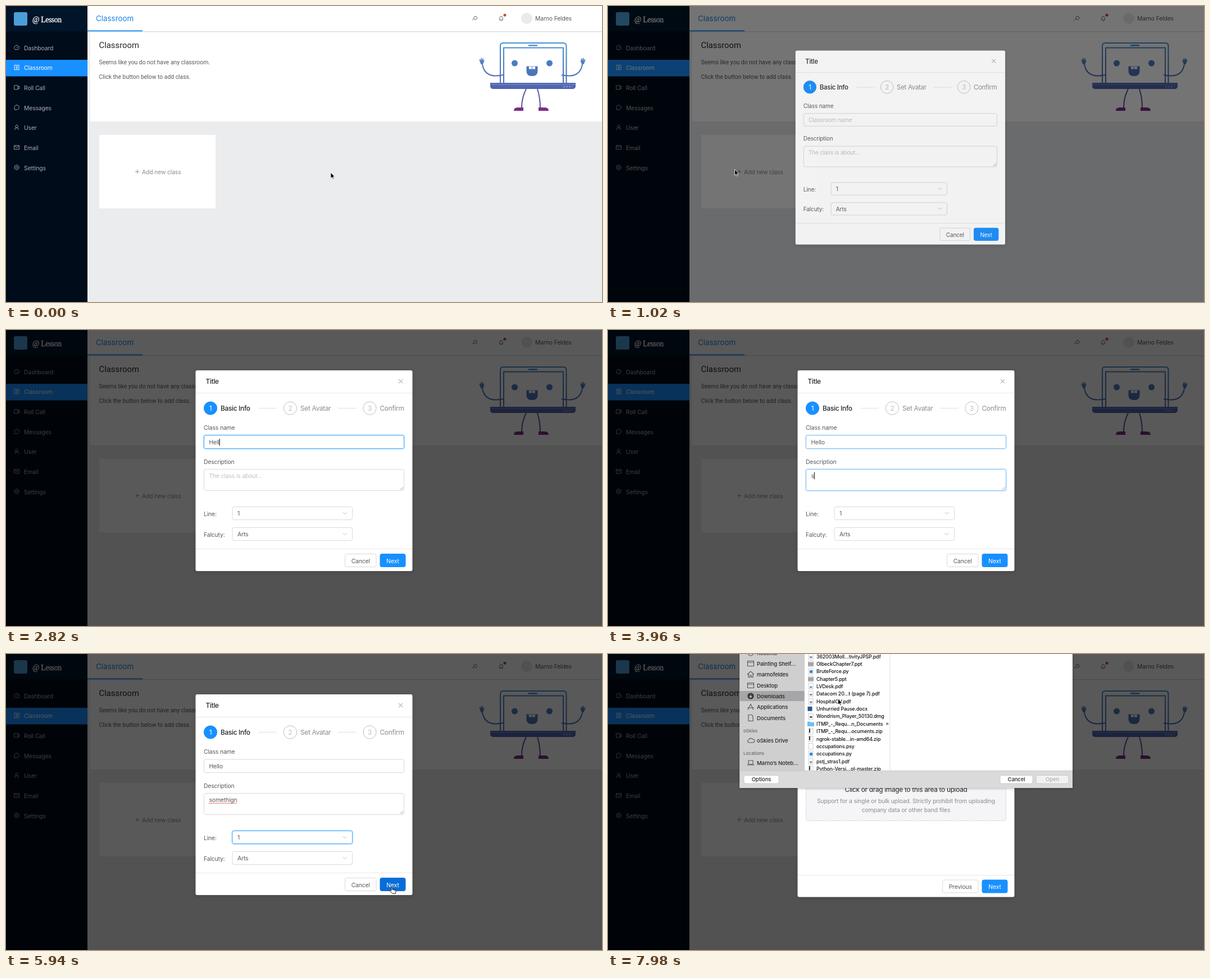
An HTML page that plays this animation: 1061x528 px, repeating every 8000 ms.

```html
<!DOCTYPE html>
<html lang="en">
<head>
<meta charset="utf-8">
<title>Classroom</title>
<style>
html, body { margin: 0; width: 100%; height: 100%; overflow: hidden; background: #ebecee; }
svg { display: block; }
text { font-family: Inter, sans-serif; white-space: pre; }
.page { font-family: Roboto, sans-serif; }
.brand { font-family: "Liberation Serif", serif; }
.mid { text-anchor: middle; }
.bold, #sheet text { font-weight: 500; }
</style>
</head>
<body>
<svg id="stage" width="1061" height="528" viewBox="0 0 1061 528"></svg>
<script>
const LOOP = 8000;
const BLUE = '#1890ff', LIGHT = '#40a9ff', DARK = '#096dd9';
const INK = '#262626', BODY = '#595959', PALE = '#bfbfbf', EDGE = '#d9d9d9';

// ---- markup helpers ----
const text = (x, y, size, str, fill = BODY, more = '') =>
  `<text x="${x}" y="${y}" font-size="${size}" fill="${fill}" letter-spacing="${size > 11 ? -.025 : -.015}em" ${more}>${str}</text>`;
const rect = (x, y, w, h, fill, more = '') =>
  `<rect x="${x}" y="${y}" width="${w}" height="${h}" fill="${fill}" ${more}/>`;
const line = (d, stroke, width = 1, more = '') =>
  `<path d="${d}" fill="none" stroke="${stroke}" stroke-width="${width}" ${more}/>`;
const dot = (x, y, r, fill, more = '') => `<circle cx="${x}" cy="${y}" r="${r}" fill="${fill}" ${more}/>`;
const group = (id, body) => `<g id="${id}">${body}</g>`;
const at = (x, y, body) => `<g transform="translate(${x} ${y})">${body}</g>`;
const field = (id, x, y, w, h) =>
  rect(x - 1, y - 1, w + 2, h + 2, 'none', `id="${id}Glow" rx="4" stroke="${BLUE}" stroke-opacity=".2" stroke-width="2"`) +
  rect(x, y, w, h, '#fff', `id="${id}" rx="3" stroke="${EDGE}"`);
const button = (x, y, w, label, fill, ink, edge, id = '') =>
  rect(x, y, w, 23, fill, `rx="3" stroke="${edge}" ${id && `id="${id}"`}`) +
  text(x + w / 2, y + 16, 10.4, label, ink, 'class="mid"');

// ---- page ----
const menu = [
  ['Dashboard', 'M-3 3.6A4.3 4.3 0 1 1 3 3.6ZM0 1L2 -1.5'],
  ['Classroom', 'M-4 -4H4V4H-4ZM-1.5 -1.8H2M-1.5 0H2M-1.5 1.8H2'],
  ['Roll Call', 'M-4.4 -3.5H2.2V3.5H-4.4ZM2.2 -1.3L4.6 -2.4V2.4L2.2 1.3'],
  ['Messages', 'M-4 4V0A4.1 4.1 0 1 1 0 4Z'],
  ['User', 'M-3.6 4.4Q-3.4 .6 0 .6T3.6 4.4M0 .6A2.4 2.4 0 1 1 .1 .6'],
  ['Email', 'M-4.4 -3.4H4.4V3.4H-4.4ZM-4.2 -3L0 .4 4.2 -3'],
  ['Settings', 'M0 -4.4L3.8 -2.2V2.2L0 4.4 -3.8 2.2V-2.2ZM0 -1.6A1.6 1.6 0 1 0 .1 -1.6']
];

const sidebar = rect(0, 0, 145, 528, '#000c1a') + rect(0, 0, 145, 45, '#001529') +
  rect(14, 11, 24, 24, '#4a9fd8', 'rx="3"') +
  text(47, 29, 13.6, '@ Lesson', '#fff', 'class="brand" stroke="#fff" stroke-width=".3"') +
  rect(0, 96, 145, 29.5, BLUE) +
  menu.map(([label, icon], i) => {
    const y = 75 + 35.65 * i, ink = i == 1 ? '#fff' : '#a6adb4';
    return at(19, y - 1, line(icon, ink, .9)) + text(32, y + 3.8, 10.4, label, ink);
  }).join('');

const header = rect(145, 0, 916, 45, '#fff') + rect(145, 45, 916, 1.5, '#dcdde0') +
  text(160, 26.5, 13.4, 'Classroom', '#1c84e6', 'style="letter-spacing:0"') +
  rect(145, 43.4, 98, 1.8, BLUE) +
  line('M834.8 24A2.9 2.9 0 1 1 835.2 24.1M832.8 22.8L830 25.6', BODY, 1) +
  line('M877.8 24.8H885.2M878.8 24.5V21.5A2.7 2.7 0 0 1 884.2 21.5V24.5M880.6 26.3H882.4M881.5 18V19', BODY, .9) +
  dot(888, 16.3, 2.5, '#c4512d') + dot(927, 22, 10, '#e9eaec') +
  text(942, 26, 10.4, 'Marno Feldes');

const palm = 'M-1.5 6L-3.5 1Q-5 -3 -3.6 -3T-1.6 0L-1.6 -5Q-.8 -6 0 -5L.5 -1 2 -5Q3.4 -5 3 -3L2.6 0 4 -1.6Q5 -1.6 4.4 0L2 6Z';
const mascot = `<linearGradient id="tone" gradientUnits="userSpaceOnUse" x1="0" y1="62" x2="0" y2="188">
  <stop stop-color="#4592d4"/><stop offset=".6" stop-color="#4f6ab2"/><stop offset="1" stop-color="#64429a"/></linearGradient>` +
  line('M880 137V71Q880 66 885 66H992Q997.5 66 997.5 71V137M886 137V74.5H992V137', 'url(#tone)', 2) +
  line('M930 70.3H946', 'url(#tone)', 2.4) +
  line('M885 123Q852 130 848 104M989 123Q1022 130 1026 104M926 148Q918 164 918 181M946 148Q951 164 951 181', 'url(#tone)', 2) +
  `<g fill="url(#tone)"><path d="M862 137H1014V143Q1014 148 1008 148H868Q862 148 862 143Z"/>
  <circle cx="905.5" cy="102" r="5.5"/><circle cx="967.5" cy="102" r="5.5"/>
  <path d="M926.5 107.5H946.5V116Q946.5 125 936.5 125T926.5 116Z"/></g>` +
  line('M863 140H1013', '#7f9ed0', .8) + line('M992 144H1008', '#cfd8ee', 1, 'stroke-dasharray="3 2"') +
  rect(931, 108, 5, 4.5, '#fff') + rect(937, 108, 5, 4.5, '#fff') +
  at(847, 98, `<path d="${palm}" fill="#4f7fc4"/>`) +
  `<path transform="translate(1027 98) scale(-1 1)" d="${palm}" fill="#4f7fc4"/>` +
  '<path d="M904 187Q904 180.5 912 181H921V187ZM966 187Q966 180.5 958 181H948V187Z" fill="#7b2f84"/>';

const page = rect(0, 0, 1061, 528, '#ebecee') + rect(149.5, 46, 911.5, 160, '#fff') + header +
  text(165.5, 75, 14.84, 'Classroom', INK, 'class="page" style="letter-spacing:0"') +
  text(165.5, 104, 10.35, 'Seems like you do not have any classroom.', BODY, 'class="page" style="letter-spacing:0"') +
  text(165.5, 130, 10.35, 'Click the button below to add class.', BODY, 'class="page" style="letter-spacing:0"') +
  mascot + rect(166, 230, 207, 131, '#fff') +
  line('M230 295.5H237.5M233.7 291.7V299.3', '#8c8c8c', .9) +
  text(242, 300, 10.4, 'Add new class', '#8c8c8c') + sidebar;

// ---- modal ----
const step = (x, n, label, state) => {
  const on = state == 'on', done = state == 'done';
  return dot(x, 139.5, 11.6, on ? BLUE : '#fff', `stroke="${on || done ? BLUE : PALE}"`) +
    (done ? line(`M${x - 4.5} 139L${x - 1} 142.5 ${x + 5} 135`, BLUE, 1.2)
          : text(x, 143.7, 11.87, n, on ? '#fff' : PALE, 'class="mid"')) +
    text(x + 18, 144, 11.87, label, on ? INK : done ? BODY : '#8c8c8c', on ? 'class="bold"' : '');
};
const select = (id, y, label, value) => text(352, y + 16.3, 10.4, label) +
  field(id, 403, y, 213.5, 23) + text(412, y + 15.5, 10.4, value) +
  line(`M599.5 ${y + 9.5}L603 ${y + 13} 606.5 ${y + 9.5}`, PALE, 1);

const form = step(364, 1, 'Basic Info', 'on') + step(506, 2, 'Set Avatar') + step(647.5, 3, 'Confirm') +
  line('M450 139.5H482M591 139.5H624', '#e0e0e0') +
  text(352, 178, 10.4, 'Class name') + field('name', 352.5, 188, 356, 23.5) +
  text(361.5, 204, 10.4, '', PALE, 'id="nameText"') +
  text(352, 238.5, 10.4, 'Description') + field('desc', 352.5, 248.5, 356, 38) +
  text(361.5, 263.8, 10.4, '', PALE, 'id="descText"') +
  line('M702 285L707 280M705 285L707 283', '#8c8c8c', .8) +
  line('M361.5 266.3H411.5', '#e0442e', 1.3, 'id="typo" stroke-dasharray="1.5 1"') +
  line('M0 -10V2.5', '#000', 1, 'id="caret"') +
  select('line', 315.5, 'Line:', '1') + select('faculty', 352.5, 'Falcuty:', 'Arts') +
  line('M338 390.5H723', '#e8e8e8') +
  button(603.5, 399.5, 55.5, 'Cancel', '#fff', BODY, EDGE) + button(666, 399.5, 45, 'Next', BLUE, '#fff', BLUE, 'next1');

const upload = step(364, 1, 'Basic Info', 'done') + step(506, 2, 'Set Avatar', 'on') + step(647.5, 3, 'Confirm') +
  line('M447 139.5H482', BLUE) + line('M595 139.5H624', '#e0e0e0') +
  rect(352.5, 167, 356, 130.5, '#f5f5f7', 'id="drop" rx="3" stroke-dasharray="2.5 1.5"') +
  line('M518 196.5L521 184H539.5L543 196.5V209H518ZM518 197H525Q525.5 202 530.5 202T536 197H543', LIGHT, 2.4, 'stroke-linejoin="round"') +
  text(530.5, 246.3, 11.87, 'Click or drag image to this area to upload', INK, 'class="mid"') +
  text(530.5, 266, 10.4, 'Support for a single or bulk upload. Strictly prohibit from uploading', '#8c8c8c', 'class="mid"') +
  text(530.5, 281.7, 10.4, 'company data or other band files', '#8c8c8c', 'class="mid"') +
  line('M338 394.5H723', '#e8e8e8') +
  button(595.5, 403, 63.5, 'Previous', '#fff', BODY, EDGE) + button(666, 403, 45, 'Next', LIGHT, '#fff', LIGHT, 'next2');

const modal = rect(337.5, 72, 386, 358, '#fff', 'id="box" rx="3" style="filter:drop-shadow(0 2px 4px #0002)"') +
  text(355.5, 96.3, 11.87, 'Title', INK, 'class="bold"') +
  line('M699 88L706 95M706 88L699 95', '#8c8c8c', 1) + line('M338 112.5H723', '#e8e8e8') +
  group('form', form) + group('upload', upload);

// ---- file sheet ----
const places = [[-2, 'Recents'], [17, 'Painting Shelf…'], [36.5, 'marnofeldes'], [56, 'Desktop'], [75, 'Downloads'],
  [94.5, 'Applications'], [114, 'Documents'], [137, '#oSkies'], [154, 'oSkies Drive'], [177, '#Locations'],
  [194, 'Marno’s Noteb…'], [213.5, 'Remote Disc'], [233, 'Network'], [256, '#Media'], [272, 'Music'],
  [291.5, 'Photos'], [311, 'Movies'], [335, '#Tags'], [351, 'Green'], [370, 'Gray']];
const placeIcon = (label, y) => {
  if (/Green|Gray/.test(label)) return dot(254, y, 4.7, '#8e8e92');
  if (label == 'Downloads') return dot(254, y, 5.6, '#333') + line(`M254 ${y - 3}V${y + 2.5}M251.5 ${y}L254 ${y + 2.7} 256.5 ${y}`, '#ddd', 1.1);
  const shapes = {
    marnofeldes: 'M248 0L254 -5.5 260 0M250 -1V5H252.8V1.5H255.2V5H258V-1',
    Applications: 'M249 5L254 -5 259 5M248 1.5H260',
    Documents: 'M250 -5.5H256L258 -3V5.5H250Z',
    'oSkies Drive': 'M250.5 4A2.6 2.6 0 0 1 250.5 -1 4 4 0 0 1 257.5 -2 3 3 0 0 1 258 4Z',
    'Marno’s Noteb…': 'M250 -4H258V2.5H250ZM247.5 4H260.5',
    Movies: 'M248.5 -5H259.5V5H248.5ZM251 -5V5M257 -5V5M251 0H257',
    Recents: 'M254 -5A5 5 0 1 0 254.1 -5M254 -3V0H256.5'
  };
  return at(0, y, line(shapes[label] || 'M248.5 -4.5H259.5V4.5H248.5ZM248.5 -2H259.5', '#555', 1.1));
};
const placeList = places.map(([y, label]) => label[0] == '#'
  ? text(241, y + 3, 8.2, label.slice(1), '#6a6a6d')
  : placeIcon(label, y) + text(265, y + 3.5, 9.6, label, INK)).join('');

const files = ['362003Moll…tivityJPSP.pdf', 'OlbeckChapter7.ppt', 'BruteForce.py', 'Chapter5.ppt', 'LVDesk.pdf',
  'Datacom 20…t (page 7).pdf', 'HospitalCV.pdf', 'Unhurried Pause.docx', 'Wondrism_Player_50130.dmg',
  'ITMP_-_Requ…n_Documents', 'ITMP_-_Requ…ocuments.zip', 'ngrok-stable…in-amd64.zip', 'occupations.psy',
  'occupations.py', 'pstj_stras1.pdf', 'Python-Versi…ol-master.zip'];
const fileIcon = name => {
  const kind = name.split('.').pop();
  if (kind == name) return '<path d="M355 -4H359L360.5 -2.7H367V4.5H355Z" fill="#6fc0f0"/>';
  if (kind == 'docx') return rect(355.5, -4, 8, 8, '#2b579a');
  const leaf = rect(357, -5, 8, 10, '#fff', 'stroke="#b5b5b5" stroke-width=".7"');
  const mark = { py: [359, -2, 5, 5, '#2f86d0'], pdf: [359, 0, 4.5, 3, '#7d93a8'], zip: [358, -4.5, 2, 7, '#333'],
    ppt: [356, -3, 10, 7, '#a5a5a5'], dmg: [359, 0, 4.5, 2.5, '#444'] }[kind];
  return leaf + (mark ? rect(...mark) : '');
};
const fileList = files.map((name, i) => {
  const y = 4.2 + 13.37 * i;
  return at(0, y, fileIcon(name)) + text(371, y + 3.3, 8.8, name, '#111');
}).join('') + '<path d="M495.5 122L500.5 124.5 495.5 127Z" fill="#777"/>';

const sheetButton = (x, w, label, ink, fill) =>
  rect(x, 216.5, w, 14.5, fill, 'rx="3" stroke="#c4c4c4" stroke-width=".8"') + text(x + w / 2, 227.4, 9.6, label, ink, 'class="mid"');
const sheet = rect(234.5, -20, 592.5, 259, '#fff', 'style="filter:drop-shadow(0 1px 2px #0004)"') +
  rect(234.5, 0, 115.5, 208, '#ededef', 'id="side"') +
  `<svg width="1061" height="208" viewBox="0 0 1061 208">` +
  rect(234.5, 66, 115.5, 18, '#a6a6a8', 'id="picked"') + group('places', placeList) + group('files', fileList) + '</svg>' +
  line('M350 0V208M502 0V208', '#dcdcdc', .9) +
  rect(234.5, 208, 592.5, 31, '#ececec', 'id="foot"') + line('M234.5 208.3H827', '#c6c6c6', .8) +
  sheetButton(242, 62, 'Options', INK, '#fff') + sheetButton(698, 58, 'Cancel', INK, '#fff') +
  sheetButton(762, 58, 'Open', '#aeaeb0', '#f1f1f1');

const cursors =
  group('arrow', '<path d="M0 0V10.5L2.4 8.3 4 11.8 5.6 11.1 4.1 7.7H7.4Z" stroke="#fff" stroke-width=".8"/>') +
  group('beam', line('M-2.5 -6Q0 -6 0 -4V4Q0 6 -2.5 6M2.5 -6Q0 -6 0 -4M0 4Q0 6 2.5 6M-1.5 2H1.5', '#000', 1.1)) +
  group('hand', '<path d="M-1 1.2Q-1 0 0 0T1 1.2V4.5L6.2 6Q7.3 6.4 7.2 7.5L6.4 11.8H1L-3.4 7.2Q-4 6 -3 5.6T-1 6.8Z" fill="#fff" stroke="#000" stroke-width=".9"/>');

const $ = id => document.getElementById(id);
$('stage').innerHTML = page + rect(0, 0, 1061, 528, '#000', 'id="mask"') + group('modal', modal) +
  group('sheet', sheet) + group('cursor', cursors);

// ---- motion ----
const set = (id, attrs) => { for (const k in attrs) $(id).setAttribute(k, attrs[k]); };
const show = (id, on) => set(id, { visibility: on ? 'inherit' : 'hidden' });
const paint = (id, fill) => set(id, { fill, stroke: fill });
const clamp = v => Math.max(0, Math.min(1, v));
const smooth = v => (v = clamp(v)) * v * (3 - 2 * v);

// cubic-bezier(.08, .82, .17, 1)
function zoomEase(x) {
  let lo = 0, hi = 1, u;
  const curve = (a, b) => 3 * (1 - u) ** 2 * u * a + 3 * (1 - u) * u * u * b + u ** 3;
  for (let i = 0; i < 20; i++) {
    u = (lo + hi) / 2;
    curve(.08, .17) < x ? lo = u : hi = u;
  }
  return curve(.82, 1);
}

const OPEN = 870, FOCUS = 1560, TAB1 = 3840, TAB2 = 5050, STEP2 = 6000, LOADED = 7420;
const moves = [[60, 578, 297], [780, 225.5, 291.5], [1080, 225.5, 291.5], [1500, 510, 202], [5100, 510, 202],
  [5700, 687, 415.5], [6180, 687, 415.5], [6780, 397, 196], [7320, 397, 196], [7900, 409.5, 80]];

function pointer(t) {
  const i = moves.findIndex(m => m[0] > t);
  if (i < 1) return moves[i ? moves.length - 1 : 0].slice(1);
  const [t0, x0, y0] = moves[i - 1], [t1, x1, y1] = moves[i], k = smooth((t - t0) / (t1 - t0));
  return [x0 + (x1 - x0) * k, y0 + (y1 - y0) * k];
}

const typed = (word, start, gap, t) => word.slice(0, Math.max(0, Math.floor((t - start) / gap) + 1));

function write(id, value, hint) {
  $(id).textContent = value || hint;
  set(id, { fill: value ? BODY : PALE });
}

function focus(id, t, from, to) {
  const k = t < from ? 0 : t < to ? clamp((t - from) / 200) : 1 - clamp((t - to) / 300);
  set(id, { stroke: `color-mix(in srgb, ${LIGHT} ${k * 100}%, ${EDGE})` });
  set(id + 'Glow', { opacity: k });
}

function draw(t) {
  const p = clamp((t - OPEN) / 300), k = .2 + .8 * zoomEase(p), fade = clamp((t - OPEN) / 180);
  set('mask', { opacity: .65 * fade });
  show('modal', p > 0);
  set('modal', { opacity: Math.sqrt(fade), transform: `translate(225 297) scale(${k}) translate(-225 -297)` });

  const second = t >= STEP2;
  show('form', !second);
  show('upload', second);
  set('box', { height: second ? 361.5 : 358 });

  const name = typed('Hello', 2160, 170, t), desc = typed('somethign', 3930, 110, t);
  write('nameText', name, 'Classroom name');
  write('descText', desc, 'The class is about...');
  focus('name', t, FOCUS, TAB1);
  focus('desc', t, TAB1, TAB2);
  focus('line', t, TAB2, LOOP);
  focus('faculty', t, LOOP, LOOP);
  show('typo', t >= TAB2 && !second);

  const inDesc = t >= TAB1, value = inDesc ? desc : name;
  const since = inDesc ? t - 3930 - 110 * (desc.length - 1) : name ? t - 2160 - 170 * (name.length - 1) : t - FOCUS;
  show('caret', t >= FOCUS && t < TAB2 && since % 1000 < 500);
  const width = value ? $(inDesc ? 'descText' : 'nameText').getComputedTextLength() : 0;
  set('caret', { transform: `translate(${362 + width} ${inDesc ? 263.8 : 204})` });

  const [x, y] = pointer(t);
  const overNext = x > 666 && y > 399;
  paint('next1', t >= 5920 ? DARK : overNext ? LIGHT : BLUE);
  paint('next2', t < 7600 ? LIGHT : BLUE);
  const overDrop = second && x > 352 && x < 708 && y > 167 && y < 297 && t < LOADED;
  set('drop', { stroke: overDrop ? LIGHT : '#cfcfcf' });

  const loaded = t >= LOADED;
  show('sheet', t > 7040);
  set('sheet', { transform: `translate(0 ${-239 * (1 - smooth((t - 7040) / 200))})` });
  set('places', { transform: `translate(0 ${loaded ? 0 : -175})` });
  show('files', loaded);
  show('picked', loaded);
  set('side', { fill: loaded ? '#cfcfd0' : '#ededef' });
  set('foot', { fill: loaded ? '#dadada' : '#ececec' });

  const typing = t >= 2100 && t < 5100;
  const overText = t > OPEN && !second && x > 352 && x < 708 && (y > 188 && y < 212 || y > 248 && y < 287);
  const kind = overText ? 'beam' : overNext || overDrop ? 'hand' : 'arrow';
  show('cursor', !typing);
  for (const id of ['arrow', 'beam', 'hand']) show(id, id == kind);
  set('cursor', { transform: `translate(${x} ${y})` });
}

const begin = performance.now();
function tick() {
  draw((performance.now() - begin) % LOOP);
  requestAnimationFrame(tick);
}
tick();
</script>
</body>
</html>
```
